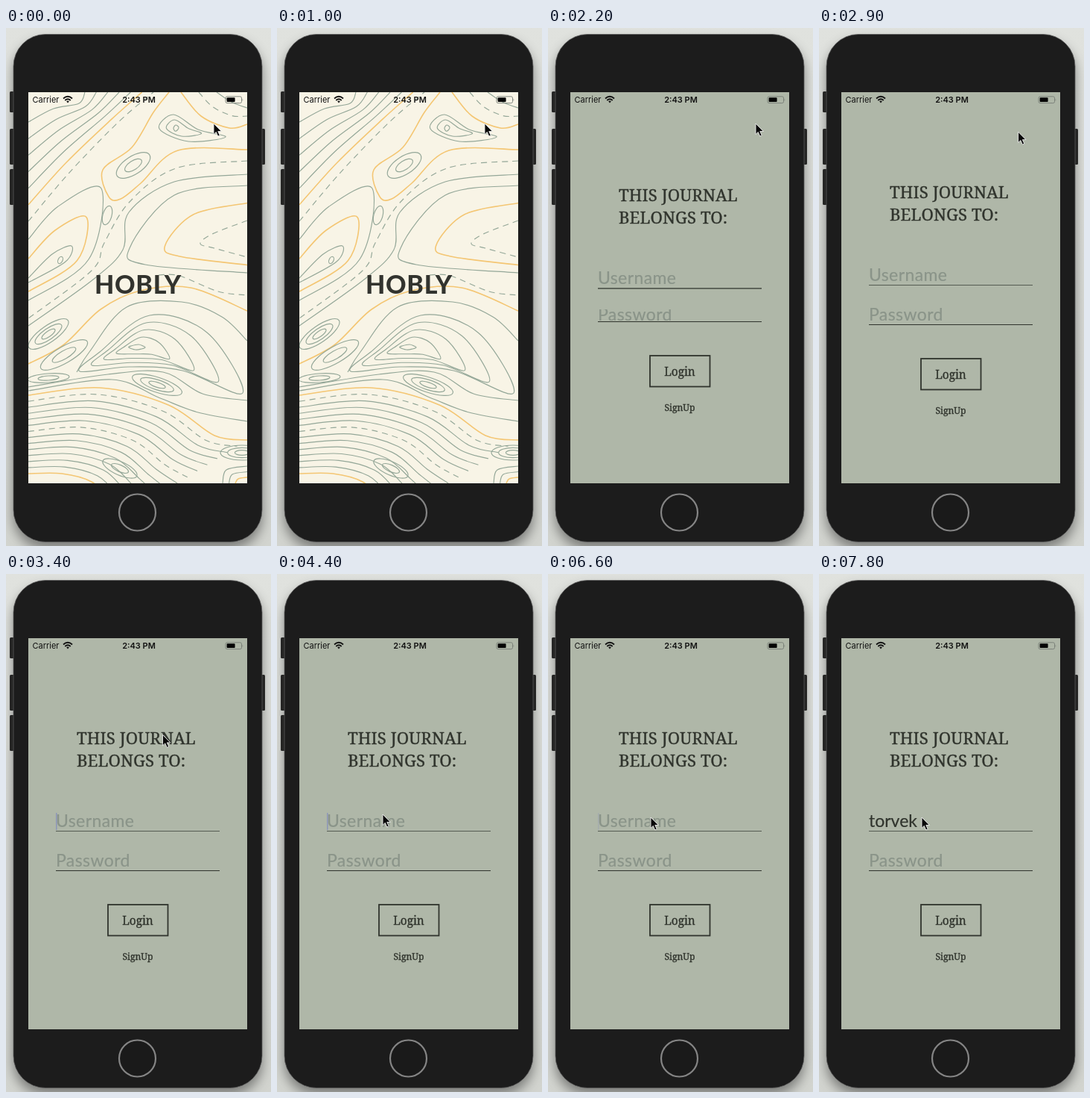
An HTML page that plays this animation: 356x694 px, repeating every 8000 ms.

```html
<!DOCTYPE html>
<html lang="en">
<head>
<meta charset="utf-8">
<title>Journal login</title>
<style>
  html, body { margin: 0; width: 100%; height: 100%; overflow: hidden; background: #dcded9; }
  svg { display: block; width: 100vw; height: 100vh; }
  #map * { fill: none; stroke: #94a798; stroke-width: 1.15; }
  #map .orange { stroke: #f4c673; stroke-width: 1.6; }
  #map .dashed { stroke-dasharray: 8 6; }
  .brand { font: 800 34px Lato, sans-serif; fill: #32332e; letter-spacing: .7px; }
  .serif { font-family: "Noto Serif", serif; fill: #30342d; stroke: #30342d; stroke-width: .35; }
  .title { font-size: 22.2px; letter-spacing: .1px; }
  .field { font: 23px Lato, sans-serif; letter-spacing: .4px; fill: #8a9489; stroke: #8a9489; stroke-width: .2; }
  .typed { fill: #30342d; stroke: #30342d; letter-spacing: 0; }
  .status { font: 11px Inter, sans-serif; fill: #111; }
  .clock { font-weight: 600; }
  .middle { text-anchor: middle; }
</style>
</head>
<body>
<svg viewBox="0 0 356 694" preserveAspectRatio="none">
  <defs>
    <clipPath id="screen"><rect x="30" y="86" width="294" height="524"/></clipPath>
    <clipPath id="passwordClip"><rect id="passwordBox" x="60" y="360" width="240" height="40"/></clipPath>
    <linearGradient id="backdrop" x2="0" y2="1">
      <stop stop-color="#e0e2de"/><stop offset="1" stop-color="#d2d4cf"/>
    </linearGradient>
    <filter id="shadow" x="-20%" y="-10%" width="140%" height="120%">
      <feDropShadow dx="0" dy="9" stdDeviation="8" flood-opacity=".42"/>
    </filter>
  </defs>

  <rect width="356" height="694" fill="url(#backdrop)"/>
  <g fill="#2c2c2b">
    <rect x="5" y="85" width="8" height="28" rx="1.5"/>
    <rect x="5" y="135" width="8" height="48" rx="1.5"/>
    <rect x="5" y="189" width="8" height="48" rx="1.5"/>
    <rect x="340" y="135" width="8" height="48" rx="1.5"/>
  </g>
  <rect x="10" y="8.5" width="334" height="680" rx="43" fill="#1c1c1c" stroke="#555" stroke-width=".8" filter="url(#shadow)"/>
  <circle cx="176.5" cy="649" r="24.5" fill="#1a1a1a" stroke="#858585" stroke-width="2.2"/>

  <g clip-path="url(#screen)">
    <g id="splash">
      <rect x="30" y="86" width="294" height="524" fill="#f8f4e6"/>
      <g id="map"></g>
      <text class="brand middle" x="177.5" y="356">HOBLY</text>
    </g>

    <g id="login">
      <rect x="30" y="86" width="294" height="524" fill="#afb7a8"/>
      <g id="upper">
        <text class="serif title" x="95" y="228">THIS JOURNAL</text>
        <text class="serif title" x="95" y="258">BELONGS TO:</text>
        <text class="field" id="username" x="67" y="339"></text>
        <rect id="caret" x="67" y="320" width="1.5" height="23" fill="#8c95b8"/>
        <rect id="userLine" x="67" y="344" width="220" fill="#555b52"/>
      </g>
      <g clip-path="url(#passwordClip)"><text class="field" x="67" y="392">Password</text></g>
      <g id="lower">
        <rect x="67" y="397" width="220" height="1" fill="#30342d"/>
        <rect x="137" y="443" width="80.5" height="41.5" fill="none" stroke="#30342d" stroke-width="1.8"/>
        <text class="serif middle" x="177" y="469.5" font-size="15.4">Login</text>
        <text class="serif middle" x="177" y="516.5" font-size="12.2">SignUp</text>
      </g>
    </g>

    <text class="status" x="35.5" y="100">Carrier</text>
    <text class="status clock middle" x="178.5" y="100">2:43 PM</text>
    <g fill="none" stroke="#111" stroke-width="1.8">
      <path d="M77 94.5Q83 89 89 94.5M79.3 97Q83 93.6 86.7 97"/>
      <path d="M81.2 98.3Q83 96.6 84.8 98.3L83 100.4Z" fill="#111" stroke="none"/>
    </g>
    <rect x="295" y="91.8" width="21.5" height="8.8" rx="2" fill="none" stroke="#777d75" stroke-width=".9"/>
    <rect x="296.6" y="93.3" width="11" height="5.8" rx=".8" fill="#050505"/>
    <path d="M317.6 94.5q1.6 1.7 0 3.4z" fill="#777d75"/>
  </g>

  <path id="pointer" d="M0 0V14.5L3.3 11.4L5.7 17L8.2 15.9L5.8 10.5H10.4Z"
        fill="#080808" stroke="#eee" stroke-width=".9"/>
</svg>

<script>
const $ = id => document.getElementById(id);
const clamp = v => Math.max(0, Math.min(1, v));
const mix = (a, b, k) => a + (b - a) * k;

function draw(tag, attributes) {
  const node = document.createElementNS("http://www.w3.org/2000/svg", tag);
  for (const name in attributes) node.setAttribute(name, attributes[name]);
  $("map").append(node);
}

// Catmull-Rom curve through the points.
function smooth(points, closed) {
  const n = points.length;
  const at = i => points[closed ? (i + n) % n : Math.max(0, Math.min(n - 1, i))];
  let d = "M" + points[0];
  for (let i = 0; i < (closed ? n : n - 1); i++) {
    const [a, b, c, e] = [at(i - 1), at(i), at(i + 1), at(i + 2)];
    d += `C${b.map((v, k) => v + (c[k] - a[k]) / 6)} ${c.map((v, k) => v - (e[k] - b[k]) / 6)} ${c}`;
  }
  return d;
}

// Evenly spaced contours blending from one curve to another.
// One letter each: g gray, o orange, d dashed.
function contours(kinds, from, to = from, closed = false) {
  const parse = text => text.split(" ").map(pair => pair.split(",").map(Number));
  const [first, last] = [parse(from), parse(to)];
  [...kinds].forEach((kind, i) => {
    const k = i / Math.max(1, kinds.length - 1);
    const points = first.map((p, j) => p.map((v, axis) => mix(v, last[j][axis], k)));
    draw("path", { d: smooth(points, closed), class: { g: "", o: "orange", d: "dashed" }[kind] });
  });
}

// Concentric tilted ovals.
function knoll(cx, cy, rx, ry, tilt, rings) {
  for (let i = rings; i > 0; i--) {
    draw("ellipse", { cx, cy, rx: rx * i / rings, ry: ry * i / rings, transform: `rotate(${tilt} ${cx} ${cy})` });
  }
}

// Upper slopes
contours("gggggod", "30,126 64,108 98,101 106,86", "30,259 84,195 150,127 198,86");
contours("odg", "235,86 262,118 300,134 324,129", "283,86 293,93 307,101 324,107");
contours("o", "324,163 231,164 181,208 154,229 138,226 130,190 169,160 198,113 219,86");
contours("ggg", "206,135 225,116 258,136 295,146 245,152", "225,134 228,130 232,133 230,137 227,138", true);
knoll(171, 184, 26, 12, -33, 2);

// Valley and left ridge
contours("dg", "324,178 228,188 166,233 132,288 115,325 30,389", "324,196 226,206 165,247 157,297 117,337 30,399");
contours("god", "324,211 226,224 166,295 187,317 324,328", "324,258 277,276 261,289 280,295 324,307");
contours("gog", "30,283 70,239 128,215 111,310 30,365", "30,335 62,303 88,292 80,313 30,341");
knoll(136, 251, 6, 13, 15, 1);
knoll(73, 311, 3, 5, 25, 1);

// Lower mountain
contours("o", "30,450 78,424 127,377 180,352 248,348 324,379");
contours("d", "205,331 233,332 285,353 324,358");
contours("g", "95,461 112,434 162,374 236,367 290,387 324,419");
contours("ggggg", "99,460 126,434 193,385 270,408 318,489 237,459 165,454",
  "165,428 168,426 178,424 184,426 187,428 182,430 174,431", true);
contours("gg", "30,481 137,464 211,461 264,490 324,499", "30,486 142,471 205,495 258,515 324,527");
knoll(57, 410, 32, 11, -35, 3);
knoll(78, 438, 36, 11, -30, 2);
knoll(57, 469, 28, 6, -4, 2);
knoll(203, 478, 35, 10, 18, 3);

// Lower strata
contours("odggggdggggggo", "30,492 126,482 218,505 280,546 324,552", "30,597 75,597 115,608 135,630 150,660");
contours("ggo", "324,587 296,592 291,610", "324,602 312,604 308,610");
knoll(153, 590, 25, 9, 24, 2);
knoll(317, 569, 29, 10, 0, 3);

const LOOP = 8000, STEP = 100, LOGIN_AT = 2200, SETTLED_AT = 2300, FILLED_AT = 7800;

// A long sweep down to the field, then a small drift.
function pointerAt(t) {
  const sweep = clamp((t - 2800) / 1200);
  const drift = clamp((t - 4400) / 600);
  return [mix(279, 142, sweep) - 4 * drift, mix(128, 322, sweep ** 1.15) + 4 * drift];
}

function caretAlpha(t) {
  const phase = t % 1000;
  return phase < 450 ? clamp((phase + 100) / 200) : clamp((700 - phase) / 300);
}

function render(t) {
  const shift = t < SETTLED_AT ? 4 : 0;
  const filled = t >= FILLED_AT;
  $("login").style.display = t >= LOGIN_AT ? "" : "none";
  $("splash").style.display = t < LOGIN_AT ? "" : "none";
  $("upper").setAttribute("transform", `translate(0 ${shift})`);
  $("lower").setAttribute("transform", `translate(0 ${-shift})`);
  $("passwordBox").setAttribute("y", shift ? 377 : 360);
  $("userLine").setAttribute("height", shift ? 1.8 : 1);
  $("username").textContent = filled ? "torvek" : "Username";
  $("username").setAttribute("class", filled ? "field typed" : "field");
  $("caret").setAttribute("opacity", t < SETTLED_AT || filled ? 0 : caretAlpha(t));
  $("pointer").setAttribute("transform", `translate(${pointerAt(t)})`);
}

const start = performance.now();
function tick() {
  const elapsed = (performance.now() - start) % LOOP;
  render(Math.floor(elapsed / STEP) * STEP);
  requestAnimationFrame(tick);
}
tick();
</script>
</body>
</html>
```
